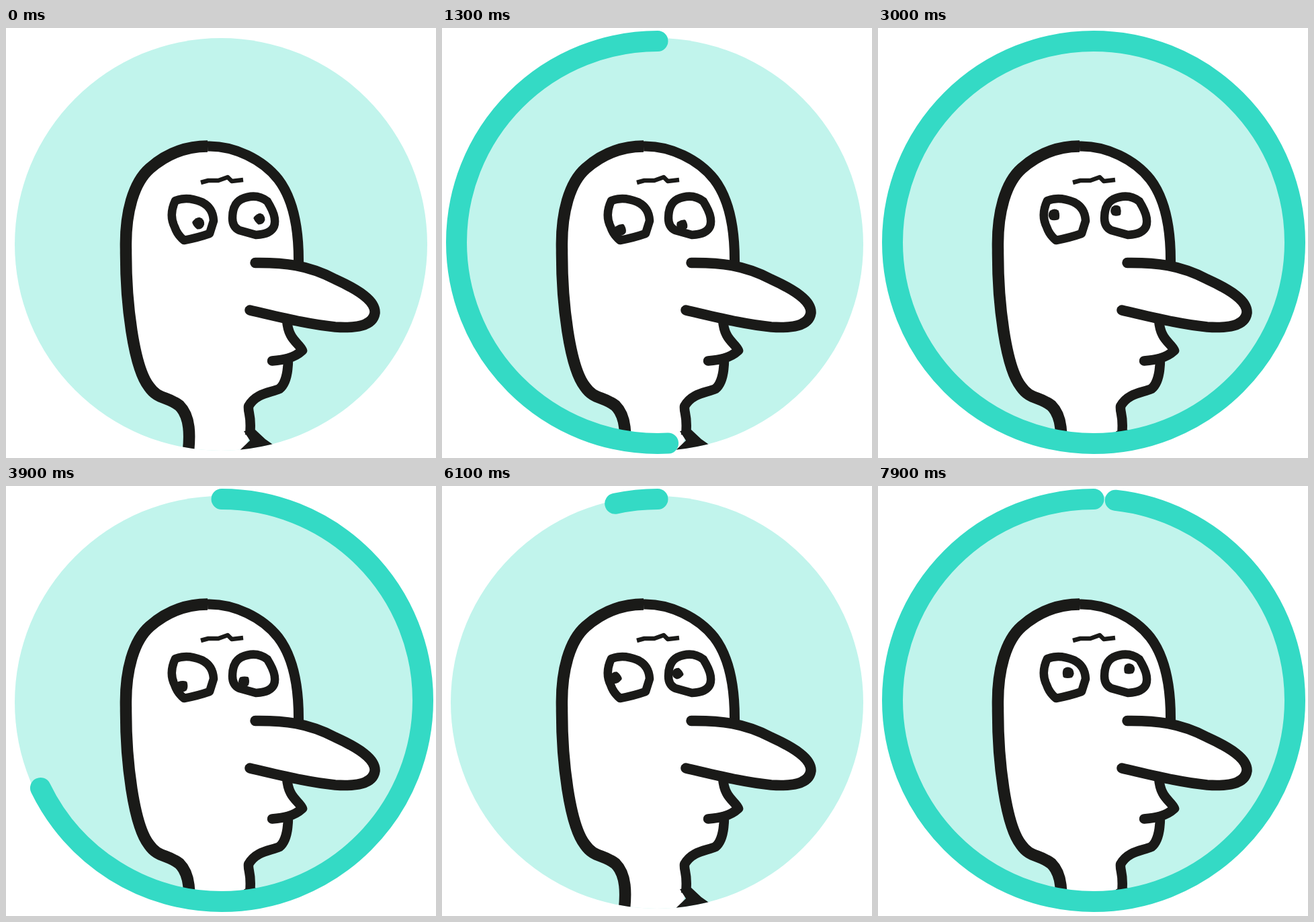
An HTML page for the animation above (8 s loop, 640 by 640 pixels).

```html
<!DOCTYPE html>
<html lang="en">
<head>
<meta charset="utf-8">
<title>Waiting</title>
<style>
html, body { margin: 0; width: 100%; height: 100%; overflow: hidden; background: #fff; }
svg { display: block; width: 100vw; height: 100vh; }
path { fill: none; stroke: #1a1a18; stroke-linejoin: round; }
.round { stroke-linecap: round; }
.skin { fill: #fff; }
.solid { fill: #1a1a18; stroke: none; }
#ring { fill: none; stroke: #34dac5; stroke-width: 31; stroke-linecap: round; }
</style>
</head>
<body>
<svg viewBox="0 0 640 640">
  <clipPath id="disc"><circle cx="320" cy="322" r="307"/></clipPath>
  <circle cx="320" cy="322" r="307" fill="#c1f4ec"/>
  <g id="man" clip-path="url(#disc)"></g>
  <circle id="ring" r="299.5" pathLength="360" transform="translate(321 319) rotate(-90) scale(1 -1)"/>
</svg>
<script>
const man = document.getElementById('man');
const ring = document.getElementById('ring');

function add(d, width, cls = '') {
  const path = document.createElementNS('http://www.w3.org/2000/svg', 'path');
  path.setAttribute('d', d);
  path.setAttribute('stroke-width', width);
  path.setAttribute('class', cls);
  man.append(path);
  return path;
}

const back = `270,642 C275,605 274,578 258,562 C240,548 226,553 213,534
  C190,505 178,410 178.5,330 C177,275 190,230 214,209 C238,188 268,176 300,176`;
const brow = '300,176 C340,175 382,196 405,225 C428,255 436,300 435.5,350';
const lips = '418,434 C420,465 436,468 441,480 C428,492 412,494 396,495.5';
const jaw = '420,492 C420,512 416,530 407,537 C394,543 372,543 361,563 C360,575 366,575 363,606';

add(`M${back} L${brow} L${lips} L${jaw} L350,642Z`, 0, 'skin');
add(`M${back}`, 17.5);
add(`M${brow}`, 15);
add(`M${lips}`, 14.5, 'round');
add(`M${jaw}`, 14.5);
add('M354,600 L363,614 340,636 H420 L386,612 371,598Z', 0, 'solid');

// Nose, worry line and eyes
add(`M371,349.5 C415,349 450,353 490,374 C525,390 550,406 549,424
  C546,444 520,447 490,445 C450,441 415,432 363,420`, 15.5, 'skin round');
add('M290,230 L301,227 H316 L330,222 336,228 353,226', 6.5);
add(`M252,257 Q270,250 291,259 Q308,267 309,287 L303,306
  Q286,312 265,316 Q255,308 251,296 Q242,278 252,257Z`, 12.5);
add(`M337,283 Q337,262 350,255 Q372,245 389,258 L393,265
  Q403,283 399,295 Q394,307 372,308 L347,301 Q337,296 337,283Z`, 12.5);

const pupils = [[272.5, 288, 1], [364, 281.5, 0.95]].map(([x, y, size]) => ({
  x, y, size, path: add('M5,-1Q9,-8 14,-9Q22,-8 23,0Q22,8 14,9Q8,6 5,1Z', 0, 'solid')
}));

// Time and counter-clockwise gaze angle
const gaze = [[0, -11], [800, 118], [1900, 388], [3900, 584], [4900, 734], [8000, 1136]];

function gazeAt(t) {
  const i = gaze.findIndex(key => key[0] > t);
  const [t0, a0] = gaze[i - 1], [t1, a1] = gaze[i];
  return a0 + (a1 - a0) * (t - t0) / (t1 - t0);
}

// Sine-eased turn from 0 to 360 degrees
function sweep(t, start, duration) {
  const p = Math.min(1, Math.max(0, (t - start) / duration));
  return 180 * (1 - Math.cos(Math.PI * p));
}

function draw(now) {
  const time = now % 8000;
  const t = time - time % 100;
  const again = t > 5500;
  const head = again ? sweep(t, 5834, 2255) : sweep(t, 62, 2450);
  const tail = again ? 0 : sweep(t, 3003, 2336);
  ring.style.visibility = head > tail ? 'visible' : 'hidden';
  ring.setAttribute('stroke-dasharray', `${head - tail} 720`);
  ring.setAttribute('stroke-dashoffset', -tail);
  for (const { x, y, size, path } of pupils) {
    path.setAttribute('transform', `translate(${x} ${y}) rotate(${-gazeAt(t)}) scale(${size})`);
  }
  requestAnimationFrame(draw);
}
requestAnimationFrame(draw);
</script>
</body>
</html>
```
